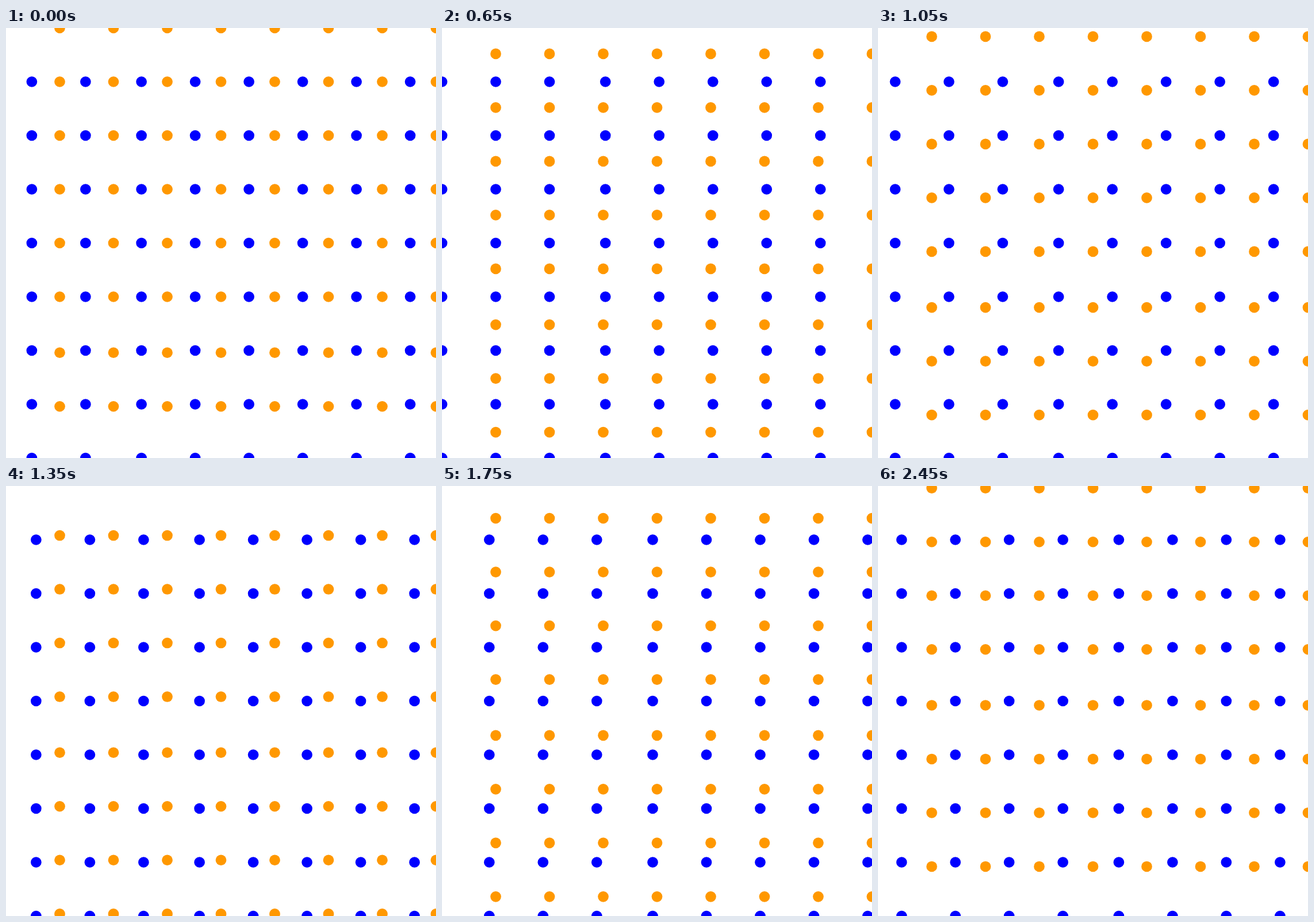
An HTML page with a canvas that plays this animation: 748 px wide and 748 px high, repeating every 2.5 s.

```html
<!DOCTYPE html>
<html lang="en">
<head>
<meta charset="utf-8">
<title>Crossing dots</title>
<style>
  html, body { margin: 0; width: 100%; height: 100%; overflow: hidden; background: #fff; }
  canvas { display: block; }
</style>
</head>
<body>
<canvas id="stage" width="748" height="748"></canvas>
<script>
const SIZE = 748;
const UNIT = SIZE / 200;   // distance moved per step
const GAP = 25;            // grid spacing in units
const WRAP = 201;          // positions 0 to 200, then back to 0
const STEP_MS = 50;
const STEPS = 50;
const ctx = document.getElementById("stage").getContext("2d");

function dot(x, y, color) {
  ctx.fillStyle = color;
  ctx.beginPath();
  ctx.arc(x * UNIT, y * UNIT, 2.5 * UNIT, 0, 2 * Math.PI);
  ctx.fill();
}

function draw() {
  const step = Math.floor(performance.now() / STEP_MS) % STEPS;
  ctx.clearRect(0, 0, SIZE, SIZE);
  for (let lane = 1; lane <= 8; lane++) {
    for (let i = 0; i < 8; i++) {
      const right = (63 + GAP * i + step) % WRAP;
      const up = (151 + GAP * i - step + WRAP) % WRAP;
      dot(right, GAP * lane, "#00f");
      dot(GAP * lane, up, "#ff9800");
    }
  }
  requestAnimationFrame(draw);
}
draw();
</script>
</body>
</html>
```
